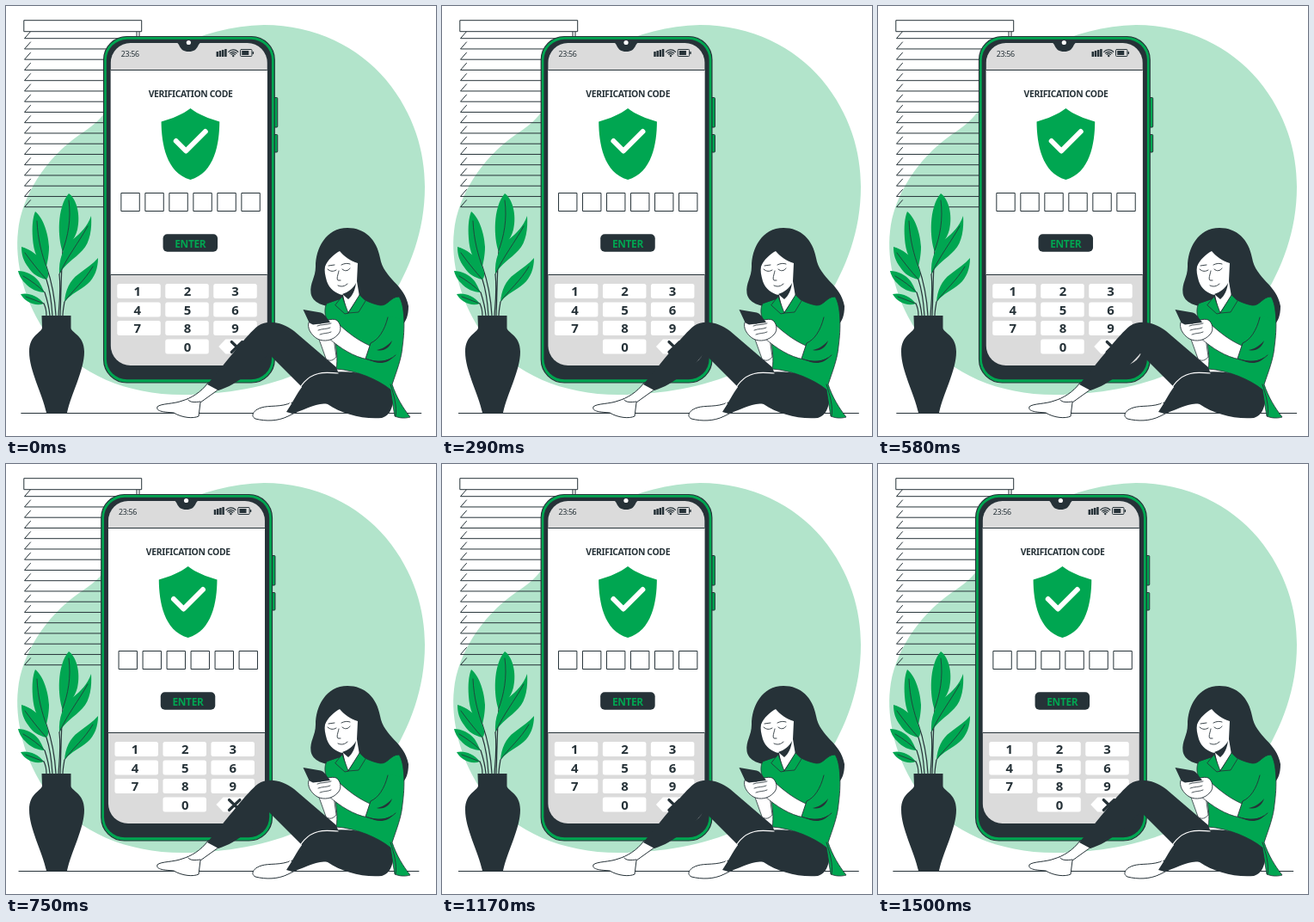
These frames come from a looping animation (500x500 px, 1540 ms). An HTML page with a canvas:

```html
<!DOCTYPE html>
<html lang="en">
<head>
<meta charset="utf-8">
<title>Verification code</title>
<style>
html, body { margin: 0; width: 100%; height: 100%; overflow: hidden; background: #fff; }
canvas { display: block; width: 500px; height: 500px; }
</style>
</head>
<body>
<canvas id="stage"></canvas>
<script>
const GREEN = '#00a651', PALE = '#b2e4cb', DARK = '#263238', GRAY = '#dbdbdb', WHITE = '#fff';
const LOOP = 1540, STEP = 1000 / 24;
const FONT = "'Noto Sans', 'Open Sans', sans-serif";

const canvas = document.getElementById('stage');
const ratio = window.devicePixelRatio || 1;
canvas.width = canvas.height = 500 * ratio;
const ctx = canvas.getContext('2d');

function paint(path, fill, stroke, width = 1) {
  if (fill) { ctx.fillStyle = fill; ctx.fill(path); }
  if (stroke) { ctx.strokeStyle = stroke; ctx.lineWidth = width; ctx.stroke(path); }
}

const shape = (d, fill, stroke, width) => paint(new Path2D(d), fill, stroke, width);
const line = (d, color = DARK, width = 1) => shape(d, null, color, width);

function box(x, y, w, h, radius, fill, stroke, width) {
  const path = new Path2D();
  path.roundRect(x, y, w, h, radius);
  paint(path, fill, stroke, width);
}

function dot(x, y, r, fill) {
  const path = new Path2D();
  path.arc(x, y, r, 0, Math.PI * 2);
  paint(path, fill);
}

// Centred condensed text, set smaller when it would exceed its room.
function label(text, x, y, size, room, color = DARK, weight = 600) {
  const setSize = px => {
    ctx.font = `${weight} ${px}px ${FONT}`;
    ctx.fontStretch = 'extra-condensed';
    ctx.letterSpacing = '-0.35px';
  };
  setSize(size);
  const width = ctx.measureText(text).width;
  if (width > room) setSize(size * room / width);
  ctx.textAlign = 'center';
  ctx.fillStyle = color;
  ctx.fillText(text, x, y);
}

// Horizontal shake: [time in ms, offset in px], linear in between.
const SHAKE = [[0, 0], [150, -1], [300, 2], [450, -4], [600, 4], [750, -4],
  [900, 4], [1050, -4], [1200, 2], [1350, -1], [1500, 0]];

function shakeAt(ms) {
  const t = ms % 1500;
  const k = Math.floor(t / 150);
  const [t0, a] = SHAKE[k], [t1, b] = SHAKE[k + 1];
  return a + (b - a) * (t - t0) / (t1 - t0);
}

function drawBackground() {
  shape(`M300 22 C360 22 410 48 442 86 C475 126 487 170 487 210
    C487 262 470 305 445 345 C425 380 390 405 345 425 C305 443 255 452 205 452
    C140 452 85 428 50 385 C20 345 10 295 14 262 C18 222 45 178 85 150
    C110 134 115 125 128 105 C160 60 225 24 300 22Z`, PALE);
  line('M152 30 V37 M155 30 V37');
  for (let i = 0; i < 17; i++) {
    const y = 37.7 + i * 12.25;
    line(`M28.5 ${y - 8} L21.5 ${y} H157`);
  }
  box(21.2, 16.7, 136.5, 13, 0, WHITE, DARK);
}

function drawStatusBar() {
  label('23:56', 144, 59.3, 13, 21.5, DARK, 400);
  for (let i = 0; i < 4; i++) {
    const h = 6 + i;
    box(244.3 + i * 3.2, 59 - h, 2.5, h, 0.5, DARK);
  }
  for (const r of [3, 5.2, 7.6]) {
    const arc = new Path2D();
    arc.arc(264, 58.5, r, -Math.PI * 0.76, -Math.PI * 0.24);
    paint(arc, null, DARK, 1.2);
  }
  dot(264, 58, 1.2, DARK);
  box(272.3, 50.5, 13.4, 8, 1, null, DARK);
  box(274, 52, 8, 5, 0, DARK);
  box(286.3, 53, 1.5, 3, 0.5, DARK);
}

function drawKeypad() {
  const centers = [152.3, 210.5, 266];
  for (let n = 0; n < 10; n++) {
    const col = n ? (n - 1) % 3 : 1;
    const row = n ? Math.floor((n - 1) / 3) : 3;
    box(129 + col * 56, 323 + row * 21.5, 50.5, 17, 2.5, WHITE);
    label(String(n), centers[col], 337.3 + row * 21.5, 16, 8.2);
  }
  shape('M247 396 L255 387.5 H290 Q292 387.5 292 390 V402 Q292 404.5 290 404.5 H255Z', WHITE);
  line('M262 390.5 L274.5 402.5 M274.5 390.5 L262 402.5', DARK, 3.2);
}

function drawPhone() {
  line('M17.5 473.5 H482.5');
  box(309.5, 106.5, 6, 34.5, 1, GREEN, DARK);
  box(309.5, 149.5, 6, 20.5, 1, GREEN, DARK);
  box(113.3, 35.5, 198.7, 402.5, 27, GREEN, DARK, 1.2);
  box(116.5, 38.8, 192.2, 395.5, 24, DARK);

  ctx.save();
  const screen = new Path2D();
  screen.roundRect(121.5, 43, 182, 375, 23);
  ctx.clip(screen);
  box(121, 42, 184, 377, 0, GRAY);
  box(120, 74.5, 186, 238, 0, WHITE, DARK);
  ctx.restore();

  shape('M197 42 C203 43 200 53 212.3 53 C224.5 53 221.5 43 227.5 42Z', DARK);
  dot(212.1, 42.5, 2.6, WHITE);
  drawStatusBar();

  label('VERIFICATION CODE', 214.3, 106, 14.2, 99.5);
  shape(`M214.2 119 C205 126 193 131 180.3 134.5 C180.5 160 186 194 214.2 202
    C242.4 194 247.9 160 248 134.5 C236 131 223 126 214.2 119Z`, GREEN);
  line('M197.5 157 L209 168.5 L231.5 146', WHITE, 6);
  for (let i = 0; i < 6; i++) box(134 + i * 28, 217.5, 21, 21, 0, WHITE, DARK);
  box(182.3, 265.3, 63.5, 20.4, 5, DARK);
  label('ENTER', 214, 281.2, 16.5, 36.5, GREEN);
  drawKeypad();
}

function drawPlant() {
  line(`M66 284 C64 310 64 340 63 360 M47 303 C53 320 57 342 58 360
    M62 312 C64 330 62 345 61 360 M47 318 C51 330 53 345 54 360
    M68 344 C67 350 66 355 66 360 M45 333 C48 342 50 350 51 360
    M44 346 C46 350 47 355 47 360`, DARK, 1.2);
  const leaves = [
    ['M73 218 C82 224 87 243 83 260 C80 272 72 279 66 286 C60 270 59 234 73 218Z', 'M73 226 C76 248 72 268 66 284'],
    ['M34 239 C42 245 49 262 50 280 C50 290 48 298 47 303 C37 298 32 286 31 270 C30 257 31 246 34 239Z', 'M36 250 C37 272 42 290 47 303'],
    ['M99 244 C100 258 98 275 89 284 C80 294 68 300 62 312 C61 295 66 281 77 272 C87 264 95 256 99 244Z', 'M95 256 C84 276 72 290 62 312'],
    ['M18 280 C28 283 39 290 46 302 C50 309 50 315 47 318 C38 316 31 312 26 304 C20 296 18 289 18 280Z', 'M22 287 C30 298 38 308 47 318'],
    ['M107 293 C107 305 103 316 95 323 C86 331 76 334 68 344 C69 331 74 319 84 312 C93 305 101 300 107 293Z', 'M101 303 C91 320 78 330 68 344'],
    ['M14 308 C22 308 32 312 38 320 C42 326 43 330 45 333 C37 333 28 329 22 322 C17 317 15 312 14 308Z', 'M20 314 C30 320 38 326 45 333'],
    ['M17 335 C25 333 36 336 44 346 C34 350 22 344 17 335Z', 'M23 338 L44 346']
  ];
  for (const [outline, rib] of leaves) {
    shape(outline, GREEN);
    line(rib, DARK, 0.8);
  }
  shape(`M41.5 360 H75.5 V374 C75 380 91 382 91 402 C91 424 76 450 71 473 H47
    C42 450 27 424 27 402 C27 382 42 380 42 374Z`, DARK);
}

function drawLegs() {
  shape(`M235 438 C226 450 215 456 205 459 C195 463 180 462 176 466 C174 472 185 472 195 473
    C205 479 218 480 224 477 L226 461 L247 446Z`, WHITE, DARK);
  line('M212 458 C214 461 219 461 226 460');
  shape(`M234 440 C258 412 280 382 293 372 C305 364 322 368 335 378 L384 420 L390 436
    L345 444 L305 404 C290 421 270 440 247 447Z`, DARK);
  shape(`M332 461 C320 467 306 464 297 467 C287 470 284 477 290 480
    C302 483 316 483 328 477 L338 472Z`, WHITE, DARK);
  shape(`M326 472 C338 455 344 434 364 428 C395 421 430 428 447 440 C453 455 451 475 437 479
    C415 481 390 474 374 463 C362 460 345 471 333 474Z`, DARK);
  line('M329 464 C340 448 345 432 363 427.5 C372 425 380 427 386 427', WHITE, 1.2);
}

function drawHead() {
  shape(`M397 258 C417 258 431 271 435 293 C439 317 464 324 468 349 C468 360 465 368 460 371
    L410 352 L384 350 C370 350 356 345 354.5 334 C353 322 360 316 360 303 C360 282 372 258 397 258Z`, DARK);
  shape(`M371 303 C374 295 382 288 388 285 C393 291 401 297 409 299 L408 320 L411 338 L397 358
    L392 336 C384 335 376 329 373 320 C371 313 370 308 371 303Z`, WHITE);
  shape('M391 335 C398 333 404 328 407 322 C406 330 403 337 398 341Z', DARK);
  line(`M374 306 C377 309 381 309 384 307 M391 306 C394 309 398 308 400 305
    M375 302 L382 301 M390 301 C394 299 397 299 400 300
    M387 308 C386 313 384 317 386 319 L389 319 M386 325 C390 327 394 326 397 323`, DARK, 0.9);
}

function drawBody() {
  shape(`M391 340 L397 358 L411 337 C416 342 425 346 435 348 C444 349 447 338 457 338
    C464 348 464 375 461 396 C460 410 454 425 449 440 C454 455 462 468 470 478
    C463 480 457 479 452 477 L447 446 C432 434 408 424 384 422
    C386 410 384 400 383 388 L372 362 C370 355 371 349 373 346Z`, GREEN, DARK, 0.8);
  shape('M391 338 L398 357 L394 358 L383 348Z', GREEN, DARK, 0.8);
  shape('M411 336 L398 357 L410 356 L418 343Z', GREEN, DARK, 0.8);
  line('M447 440 C451 452 455 466 453 477', DARK, 0.9);
  shape('M362 382 L372 410 C376 414 381 412 384 408 L381 386Z', WHITE, DARK, 0.8);
  shape('M388 371 C398 380 410 390 428 397 L421 411 C404 408 389 398 376 387Z', WHITE, DARK, 0.8);
  shape(`M424 392 C433 387 440 375 444 360 L460 364 C462 380 460 395 453 406
    C444 416 430 415 418 410Z`, GREEN);
  line('M444 362 C440 378 433 388 424 392 L418 410 C430 415 444 415 453 406', DARK, 0.9);
  shape('M431 400 C437 399 443 396 449 389 C446 398 439 402 431 400Z', DARK);
  shape('M420 410 C430 414 440 414 450 408 C444 416 432 418 420 410Z', DARK);
}

function drawHands() {
  shape(`M352 368 C350 374 354 382 362 387 C370 391 380 389 386 382 C391 377 389 368 384 365
    C378 363 371 366 366 369Z`, WHITE, DARK, 0.9);
  shape('M345.5 353 L366 356.5 Q369 357 371 360 L377 368 L357 370.5 Q354 370 352 367Z', DARK);
  line('M362 372 C367 370 373 371 378 369 M363 377 C368 375 373 376 377 374 M365 382 C370 380 374 381 378 379', DARK, 0.8);
}

function render(ms) {
  // The picture advances 24 times a second on a 10 ms clock.
  const tick = Math.floor((Math.floor(ms / 10) * 10 + 4.9) / STEP);
  ctx.setTransform(ratio, 0, 0, ratio, 0, 0);
  ctx.lineCap = ctx.lineJoin = 'round';
  ctx.fillStyle = WHITE;
  ctx.fillRect(0, 0, 500, 500);
  drawBackground();
  ctx.save();
  ctx.translate(0.4 + shakeAt(tick * STEP + 20), 0);
  drawPhone();
  ctx.restore();
  drawPlant();
  drawLegs();
  drawHead();
  drawBody();
  drawHands();
}

let start;
function loop(now) {
  start ??= now;
  render((now - start) % LOOP);
  requestAnimationFrame(loop);
}
render(0);
requestAnimationFrame(loop);
</script>
</body>
</html>
```
